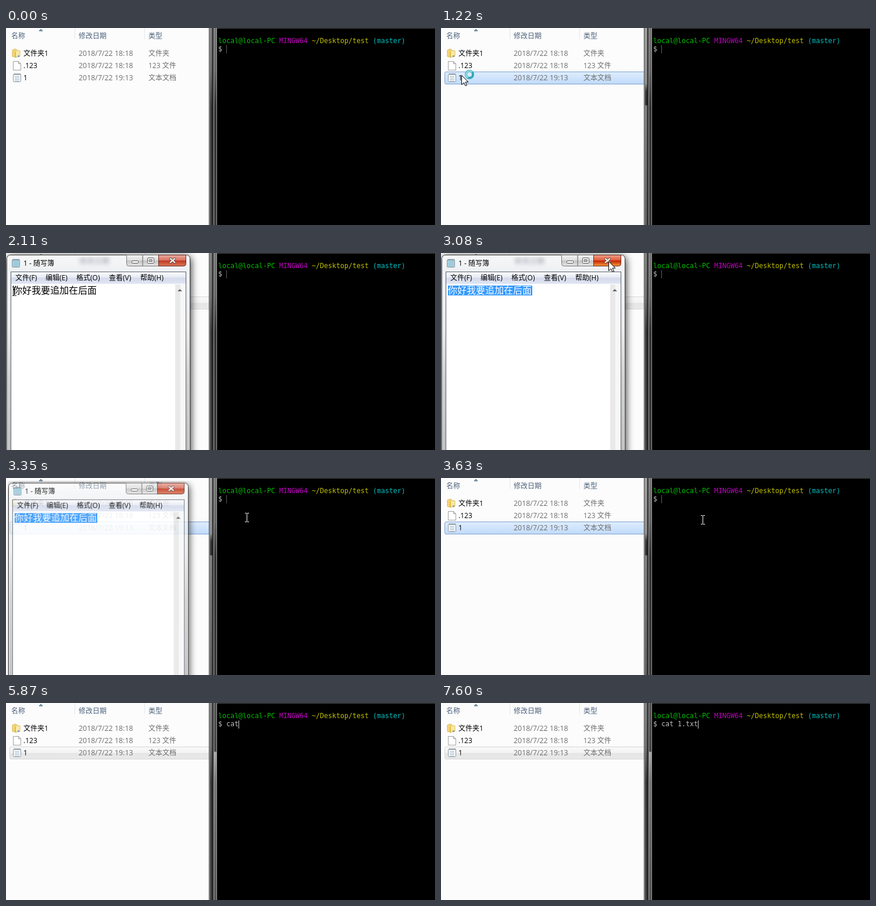
An HTML page with a canvas for the animation above (8 s loop, 738 by 339 pixels).

```html
<!DOCTYPE html>
<html lang="zh">
<head>
<meta charset="utf-8">
<style>
  html, body { margin: 0; width: 100%; height: 100%; overflow: hidden; background: #fcfcfc; }
  canvas { display: block; }
</style>
</head>
<body>
<canvas id="stage" width="738" height="339"></canvas>
<script>
const LOOP = 8000;
const UI = '"Open Sans", "Noto Sans CJK SC", "Noto Sans CJK", sans-serif';
const MONO = '11.63px "DejaVu Sans Mono", monospace';
const COMMAND = 'cat 1.txt';
const KEY_TIMES = [4700, 5750, 5870, 6300, 6860, 7010, 7320, 7460, 7600];

const TICKS = [0, 280, 420, 550, 690, 830, 1100, 1220, 1370, 1520, 1680, 1820, 1970, 2110,
  2260, 2400, 2540, 2680, 2820, 2950, 3080, 3230, 3350, 3480, 3620, 3750, 3890, 4020, 4150,
  4290, 5160, ...KEY_TIMES].sort((a, b) => a - b);

// time, x, y
const POINTER = [[280, 110, 299], [420, 88, 210], [550, 60, 130], [690, 42, 90], [830, 35, 81],
  [1220, 35, 81], [1520, 39, 85], [1680, 39, 85], [1970, 14, 66], [2110, 14, 66],
  [2540, 157, 66], [2820, 235, 35], [3080, 288, 14], [3230, 296, 20], [3350, 414, 68],
  [3620, 450, 72], [4020, 440, 66], [4289, 440, 66]];

// time, scale, opacity
const NOTE = [[1370, .97, .45], [1520, .994, .99], [1680, 1, 1], [3080, 1, 1],
  [3230, .994, .97], [3350, .981, .88], [3480, .96, .3], [3600, .94, 0]];

const stage = document.getElementById('stage').getContext('2d');
const layerCanvas = document.createElement('canvas');
layerCanvas.width = 345;
layerCanvas.height = 420;
const layer = layerCanvas.getContext('2d');

const between = (t, from, to) => t >= from && t < to;

function track(keys, t) {
  const next = keys.findIndex(key => key[0] > t);
  if (next === 0 || t > keys.at(-1)[0]) return null;
  if (next < 0) return keys.at(-1).slice(1);
  const a = keys[next - 1], b = keys[next], f = (t - a[0]) / (b[0] - a[0]);
  return a.slice(1).map((v, i) => v + (b[i + 1] - v) * f);
}

function rect(c, color, x, y, w, h) {
  c.fillStyle = color;
  c.fillRect(x, y, w, h);
}

function text(c, str, x, y, color = '#000', size = 12) {
  c.font = `${size}px ${UI}`;
  c.fillStyle = color;
  c.fillText(str, x, y);
}

function gradient(c, y0, y1, ...stops) {
  const g = c.createLinearGradient(0, y0, 0, y1);
  stops.forEach(([at, color]) => g.addColorStop(at, color));
  return g;
}

function box(c, x, y, w, h, r, fill, stroke) {
  c.beginPath();
  c.roundRect(x + .5, y + .5, w - 1, h - 1, r);
  if (fill) { c.fillStyle = fill; c.fill(); }
  if (stroke) { c.strokeStyle = stroke; c.lineWidth = 1; c.stroke(); }
}

function shape(c, points, fill, stroke) {
  c.beginPath();
  points.forEach(([x, y]) => c.lineTo(x, y));
  c.closePath();
  if (fill) { c.fillStyle = fill; c.fill(); }
  if (stroke) { c.strokeStyle = stroke; c.lineWidth = 1; c.stroke(); }
}

function folderIcon(c, x, y) {
  shape(c, [[x, y + 2], [x + 5, y], [x + 8, y + 2], [x + 8, y + 14], [x, y + 13]], '#f3d778', '#d9b851');
  shape(c, [[x + 5, y + 3], [x + 13, y + 3], [x + 13, y + 13], [x + 5, y + 14]], '#f9e9a6', '#dfc063');
  rect(c, '#e3b93f', x + 4, y + 5, 2, 10);
  rect(c, '#7fa9cf', x + 9, y + 11, 3, 3);
}

function pageIcon(c, x, y) {
  shape(c, [[x, y], [x + 9, y], [x + 13, y + 4], [x + 13, y + 15], [x, y + 15]], '#fff', '#a0a0a0');
  shape(c, [[x + 9, y], [x + 9, y + 4], [x + 13, y + 4]], '#eee', '#a0a0a0');
}

function noteIcon(c, x, y, paper) {
  box(c, x, y + 1, 14, 14, 1, paper, '#8d9aa5');
  for (let i = 0; i < 4; i++) rect(c, '#a9bccb', x + 3, y + 5 + i * 2.5, 8, 1);
  for (let i = 0; i < 5; i++) rect(c, '#76828c', x + 2 + i * 2.4, y, 1, 3);
}

function header(c) {
  const color = '#4c607a';
  text(c, '名称', 9, 18, color);
  text(c, '修改日期', 125, 18, color);
  text(c, '类型', 245, 18, color);
}

function selectedRow(c, t) {
  if (t < 690) return;
  let stops = [[0, '#f9f9f9'], [.48, '#f3f3f3'], [.52, '#e6e6e6'], [1, '#e9e9e9']], border = '#d6d6d6';
  if (t < 1100) {
    stops = [[0, '#fafbfd'], [1, '#ebf3fd']];
    border = '#b8d6fb';
  } else if (between(t, 1100, 1370) || between(t, 3230, 4150)) {
    stops = [[0, '#dfedfd'], [1, '#c0dafb']];
    border = '#7da2ce';
  }
  box(c, 6, 75, 350, 22, 2.5, gradient(c, 75, 97, ...stops), border);
}

function explorer(c, t) {
  rect(c, '#fcfcfc', 0, 0, 350, 339);
  for (const x of [118, 238]) rect(c, '#dfe8f1', x, 0, 1, 19);
  shape(c, [[57, 5], [60, 2], [63, 5]], '#7fb0d0', '#466c88');
  header(c);
  selectedRow(c, t);
  folderIcon(c, 11, 36);
  pageIcon(c, 12.5, 57.5);
  noteIcon(c, 12, 78, '#f5f9fb');
  const rows = [['文件夹1', '2018/7/22 18:18', '文件夹'], ['.123', '2018/7/22 18:18', '123 文件'],
    ['1', '2018/7/22 19:13', '文本文档']];
  rows.forEach(([name, date, kind], i) => {
    const y = 48 + i * 21;
    text(c, name, 30, y);
    text(c, date, 125, y, '#6d6d6d', 12.4);
    text(c, kind, 245, y, '#6d6d6d');
  });
}

// Two glass window borders side by side, each between a light and a dark hairline.
function windowEdges(c, t) {
  const dim = [[0, '#777'], [.22, '#666'], [.4, '#333'], [1, '#3a3a3a']];
  const explorerActive = between(t, 1100, 1370) || between(t, 3230, 4150);
  const left = explorerActive
    ? [[0, '#999'], [.28, '#888'], [.32, '#333'], [.39, '#2a2a2a'], [.395, '#777'], [1, '#555']] : dim;
  const right = t >= 4150 ? [[0, '#555'], [.245, '#444'], [.25, '#aaa'], [.4, '#777'], [1, '#555']] : dim;
  rect(c, '#333', 349, 0, 14, 339);
  rect(c, '#b4b4b4', 350, 0, 1, 339);
  rect(c, gradient(c, 0, 339, ...left), 351, 0, 4, 339);
  rect(c, '#222', 355, 0, 2, 339);
  rect(c, '#aaa', 357, 0, 1, 339);
  rect(c, gradient(c, 0, 339, ...right), 358, 0, 4, 339);
  rect(c, '#999', 362, 0, 1, 339);
}

function terminal(c, t) {
  rect(c, '#000', 363, 0, 375, 339);
  rect(c, '#444', 363, 0, 375, 1);
  c.font = MONO;
  const print = (str, x, y, color) => { c.fillStyle = color; c.fillText(str, x, y); };
  print('local@local-PC', 365, 26, '#00bf00');
  print('MINGW64', 470, 26, '#bf00bf');
  print('~/Desktop/test', 526, 26, '#bfbf00');
  print('(master)', 631, 26, '#00bfbf');
  const typed = KEY_TIMES.filter(k => k <= t).length;
  print('$ ' + COMMAND.slice(0, typed), 365, 40, '#bfbfbf');
  if (t < 4150) {
    for (let y = 30; y < 44; y += 2) rect(c, '#bfbfbf', 379, y, 1, 1);
  } else if (typed && !between(t, 5160, 5750)) {
    rect(c, '#d0d0d0', 379 + typed * 7, 30, 1, 14);
  }
}

function captionButtons(c, hot) {
  const glass = gradient(c, 3, 23, [0, '#f4f4f4'], [.48, '#dedede'], [.52, '#c4c4c4'], [1, '#e6e6e6']);
  const red = hot
    ? gradient(c, 3, 23, [0, '#f0a48e'], [.48, '#df5b38'], [.52, '#c42405'], [1, '#f7a03c'])
    : gradient(c, 3, 23, [0, '#eab0a4'], [.48, '#d8705e'], [.52, '#bf3a22'], [1, '#dc7a5c']);
  box(c, 207, 3, 29, 20, [0, 0, 0, 4], glass, '#777');
  box(c, 235, 3, 28, 20, 0, glass, '#777');
  box(c, 262, 3, 48, 20, [0, 0, 4, 0], red, '#6b2c23');
  box(c, 216, 13, 12, 5, 1, '#fff', '#555');
  box(c, 243, 8, 12, 10, 1, '#fff', '#555');
  box(c, 246, 11, 6, 4, 0, '#ccc', '#555');
  c.lineCap = 'square';
  for (const [color, width] of [['#6a4a48', 4], ['#fff', 2.2]]) {
    c.strokeStyle = color;
    c.lineWidth = width;
    c.beginPath();
    c.moveTo(283, 10); c.lineTo(290, 16);
    c.moveTo(290, 10); c.lineTo(283, 16);
    c.stroke();
  }
}

function notepad(c, t, settled) {
  c.clearRect(0, 0, 345, 420);
  c.save();
  c.shadowColor = 'rgba(0,0,0,.9)';
  c.shadowBlur = 14;
  c.shadowOffsetX = 1;
  c.shadowOffsetY = 3;
  box(c, 1, 3, 316, 560, 6, '#000');
  c.restore();
  c.globalCompositeOperation = 'destination-out';
  box(c, 1, 3, 316, 560, 6, '#000');
  c.globalCompositeOperation = 'source-over';

  const sides = [[0, 'rgba(250,250,250,.4)'], [.06, 'rgba(235,238,242,.6)'],
    [.3, '#e9e9e9'], [.5, '#cfcfcf'], [1, '#b5b5b5']];
  if (settled) {
    box(c, 1, 3, 316, 560, 6, '#f4f5f6');
    c.filter = 'blur(3px)';
    text(c, '修改日期', 126, 18, '#3c4c62', 13);
    c.filter = 'none';
  }
  box(c, 1, 3, 316, 560, 6, gradient(c, 3, 420, ...sides), '#333');
  box(c, 2, 4, 314, 558, 5, null, 'rgba(255,255,255,.8)');
  noteIcon(c, 10, 10, '#9fd2e4');
  c.save();
  c.shadowColor = '#fff';
  c.shadowBlur = 8;
  text(c, '1 - 随写簿', 30, 22);
  c.restore();
  captionButtons(c, between(t, 2950, 3350));

  rect(c, '#59636e', 8, 32, 302, 400);
  rect(c, gradient(c, 33, 53, [0, '#fbfcfe'], [.45, '#e6eaf4'], [.5, '#d5dbec'], [1, '#dfe5f2']), 9, 33, 300, 20);
  [['文件(F)', 16], ['编辑(E)', 68], ['格式(O)', 121], ['查看(V)', 177], ['帮助(H)', 231]]
    .forEach(([label, x]) => text(c, label, x, 47));
  rect(c, '#fff', 9, 53, 300, 380);
  rect(c, '#e9e9e9', 291, 54, 9, 380);
  rect(c, '#f7f7f7', 300, 54, 8, 380);
  shape(c, [[295, 66], [299, 62], [303, 66]], '#666');

  const line = '你好我要追加在后面';
  const pointer = track(POINTER, t);
  const width = t < 2110 ? 0 : t < 2540 ? Math.min(9, Math.round((pointer[0] - 12) / 16)) * 16 : 145;
  text(c, line, 12, 70, '#000', 16);
  if (width) {
    c.save();
    c.beginPath();
    c.rect(12, 56, width, 17);
    c.clip();
    rect(c, '#3399ff', 12, 56, width, 17);
    text(c, line, 12, 70, '#fff', 16);
    c.restore();
  } else {
    rect(c, '#000', 12, 56, 1, 17);
  }
}

function drawNotepad(c, t) {
  const state = track(NOTE, t);
  if (!state) return;
  const [scale, opacity] = state;
  notepad(layer, t, scale === 1);
  c.save();
  c.beginPath();
  c.rect(0, 0, 349, 339);
  c.clip();
  c.globalAlpha = opacity;
  c.translate(158.5, 285);
  c.scale(scale, scale);
  c.drawImage(layerCanvas, -158.5, -285);
  c.restore();
}

function drawPointer(c, t) {
  const at = track(POINTER, t);
  if (!at) return;
  const [x, y] = at.map(Math.round);
  if (x > 363 || (t >= 1520 && y > 54)) {
    const color = x > 363 ? '#fff' : '#000';
    rect(c, color, x, y - 7, 1, 14);
    for (const end of [y - 8, y + 7]) {
      rect(c, color, x - 3, end, 3, 1);
      rect(c, color, x + 1, end, 3, 1);
    }
    return;
  }
  if (between(t, 1220, 1520)) {
    c.lineWidth = 4;
    c.strokeStyle = '#2fa9b8';
    c.beginPath();
    c.arc(x + 14, y - 1, 6, 0, 7);
    c.stroke();
    c.lineWidth = 2;
    c.strokeStyle = '#9fe6e6';
    c.beginPath();
    c.arc(x + 14, y - 1, 6, 2, 5.5);
    c.stroke();
  }
  const arrow = [[0, 0], [0, 16], [4, 12.5], [6.5, 18], [9, 17], [6.5, 11.5], [11.5, 11.5]];
  shape(c, arrow.map(([dx, dy]) => [x + dx + .5, y + dy + .5]), '#fff', '#000');
}

function render(now) {
  const time = now % LOOP;
  const t = TICKS.findLast(tick => tick <= time);
  explorer(stage, t);
  drawNotepad(stage, t);
  windowEdges(stage, t);
  terminal(stage, t);
  drawPointer(stage, t);
}

const start = performance.now();
function frame() {
  render(Math.max(0, performance.now() - start));
  requestAnimationFrame(frame);
}
frame();
</script>
</body>
</html>
```
